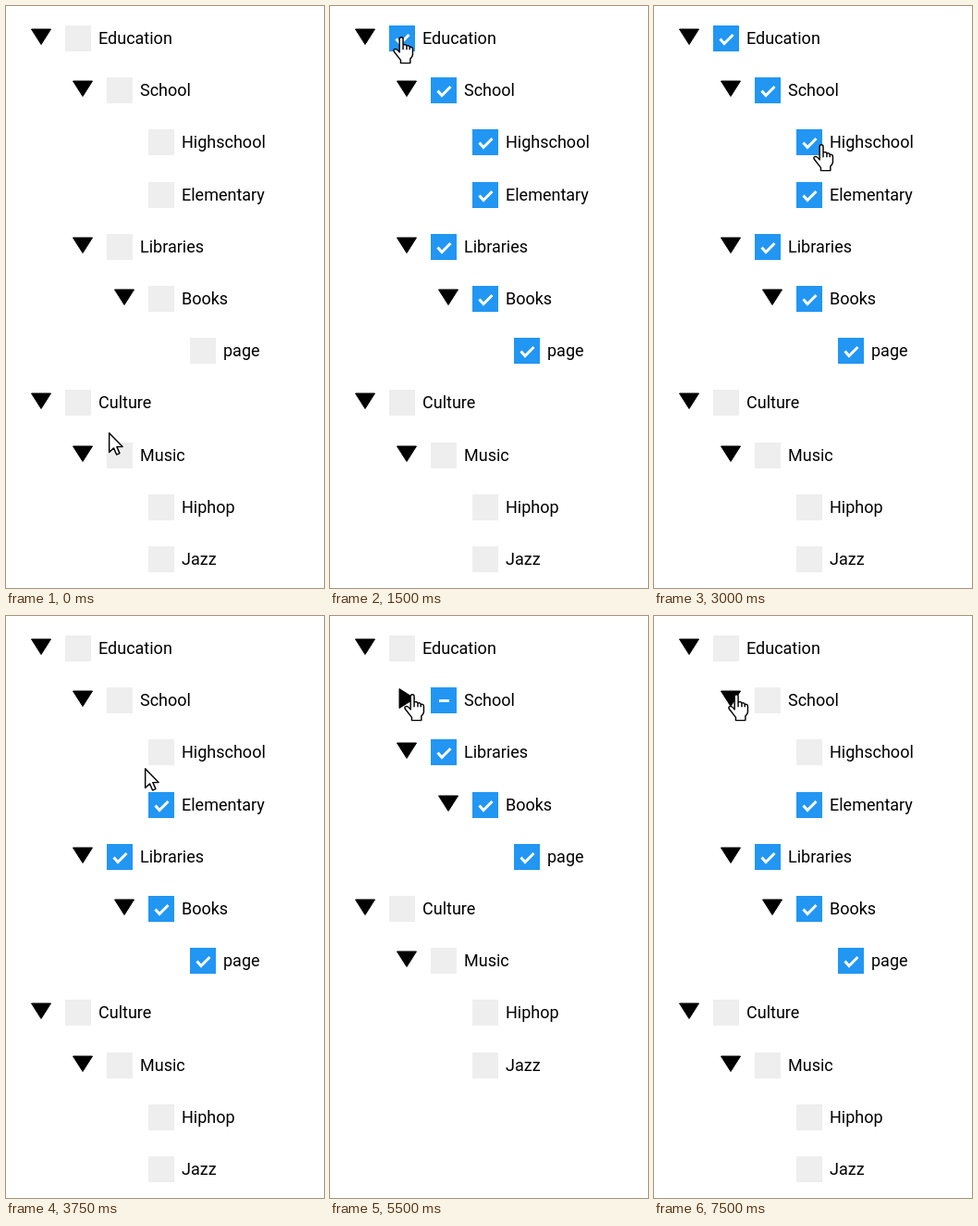
These frames come from a looping animation (344x628 px, 8 s). An HTML page:

```html
<!DOCTYPE html>
<html lang="en">
<head>
<meta charset="utf-8">
<style>
  html, body { margin: 0; width: 100%; height: 100%; overflow: hidden; background: #fff; }
  svg { display: block; width: 344px; height: 628px; }
  text { font: 18px Roboto, sans-serif; fill: #000; }
  .mark { fill: none; stroke: #fff; stroke-width: 3; }
  .cursor { fill: #fff; stroke: #000; stroke-width: 1.1; stroke-linejoin: round; }
</style>
</head>
<body>
<svg id="stage" viewBox="0 0 344 628"></svg>
<script>
const LOOP = 8000;
const stage = document.getElementById('stage');

// [label, depth, is a leaf]
const tree = [
  ['Education', 0], ['School', 1], ['Highschool', 2, true], ['Elementary', 2, true],
  ['Libraries', 1], ['Books', 2], ['page', 3, true],
  ['Culture', 0], ['Music', 1], ['Hiphop', 2, true], ['Jazz', 2, true]
];

// [time, x, y, shape]
const pointer = [
  [0, 111, 460, 'arrow'], [250, 111, 209, 'arrow'], [500, 82, 87, 'hand'],
  [750, 77, 51, 'arrow'], [1000, 68, 33, 'hand'], [1750, 51, 90, 'arrow'],
  [2000, 94, 150, 'arrow'], [2250, 127, 165, 'arrow'], [2500, 147, 166, 'arrow'],
  [2750, 167, 146, 'hand'], [3000, 172, 149, 'hand'], [3750, 150, 164, 'arrow'],
  [4000, 88, 149, 'arrow'], [4250, 86, 108, 'arrow'], [4500, 82, 88, 'hand'],
  [5000, 80, 84, 'hand']
];

const shapes = {
  arrow: 'M.5 .5V16.5L4.2 13L6.6 18.5L9.2 17.4L6.8 12H11.6Z',
  hand: 'M5.5 2Q5.5 .6 7 .6T8.5 2V7Q11 6 11.5 7.8Q13.5 7 14 8.8Q16.5 8.2 16.5 10.5V15' +
    'Q16.5 16.5 14.5 18.5V22H6.5V19.5L1 12.5Q0 10.5 2 10.3Q3.5 10.3 5.5 13Z' +
    'M8.5 7V11M11.5 8V11M14 9V11'
};

const within = (t, from, to) => t >= from && t < to;

function boxState(index, t) {
  if (index === 1 && within(t, 5500, 6750)) return 'partial';
  if (within(t, 1500, 3250) ? index < 7 : t >= 3250 && index > 2 && index < 7) return 'checked';
  const hovered = index === 0 && within(t, 1000, 1500) || index === 2 && within(t, 3250, 3750);
  return hovered ? 'hover' : 'empty';
}

function drawRow([label, depth, leaf], row, state, closed) {
  const x = 64 + 45 * depth, y = Math.round(21 + 56.2 * row);
  const fill = { empty: '#eee', hover: '#ccc' }[state] || '#2196f3';
  const mark = { checked: 'M7.5 14.5L12 19.5L21.5 10', partial: 'M9 14.5H20' }[state];
  const turn = closed ? 'rotate(-90 -26 12)' : '';
  return `<g transform="translate(${x} ${y})">` +
    (leaf ? '' : `<path d="M-36.5 4H-15.5L-26 20.5Z" stroke="#000" stroke-linejoin="round" transform="${turn}"/>`) +
    `<rect width="28" height="28" fill="${fill}"/>` +
    (mark ? `<path class="mark" d="${mark}"/>` : '') +
    `<text x="36" y="20">${label}</text></g>`;
}

function draw(t) {
  const collapsed = within(t, 5500, 6750);
  let row = 0, out = '';
  tree.forEach((node, i) => {
    if (collapsed && (i === 2 || i === 3)) return;
    out += drawRow(node, row++, boxState(i, t), collapsed && i === 1);
  });
  const [, x, y, shape] = pointer.filter(p => p[0] <= t).pop();
  return out + `<path class="cursor" d="${shapes[shape]}" transform="translate(${x} ${y}) scale(1.3)"/>`;
}

let shown = '';
function tick() {
  const picture = draw(performance.now() % LOOP);
  if (picture !== shown) stage.innerHTML = shown = picture;
  requestAnimationFrame(tick);
}
tick();
</script>
</body>
</html>
```
